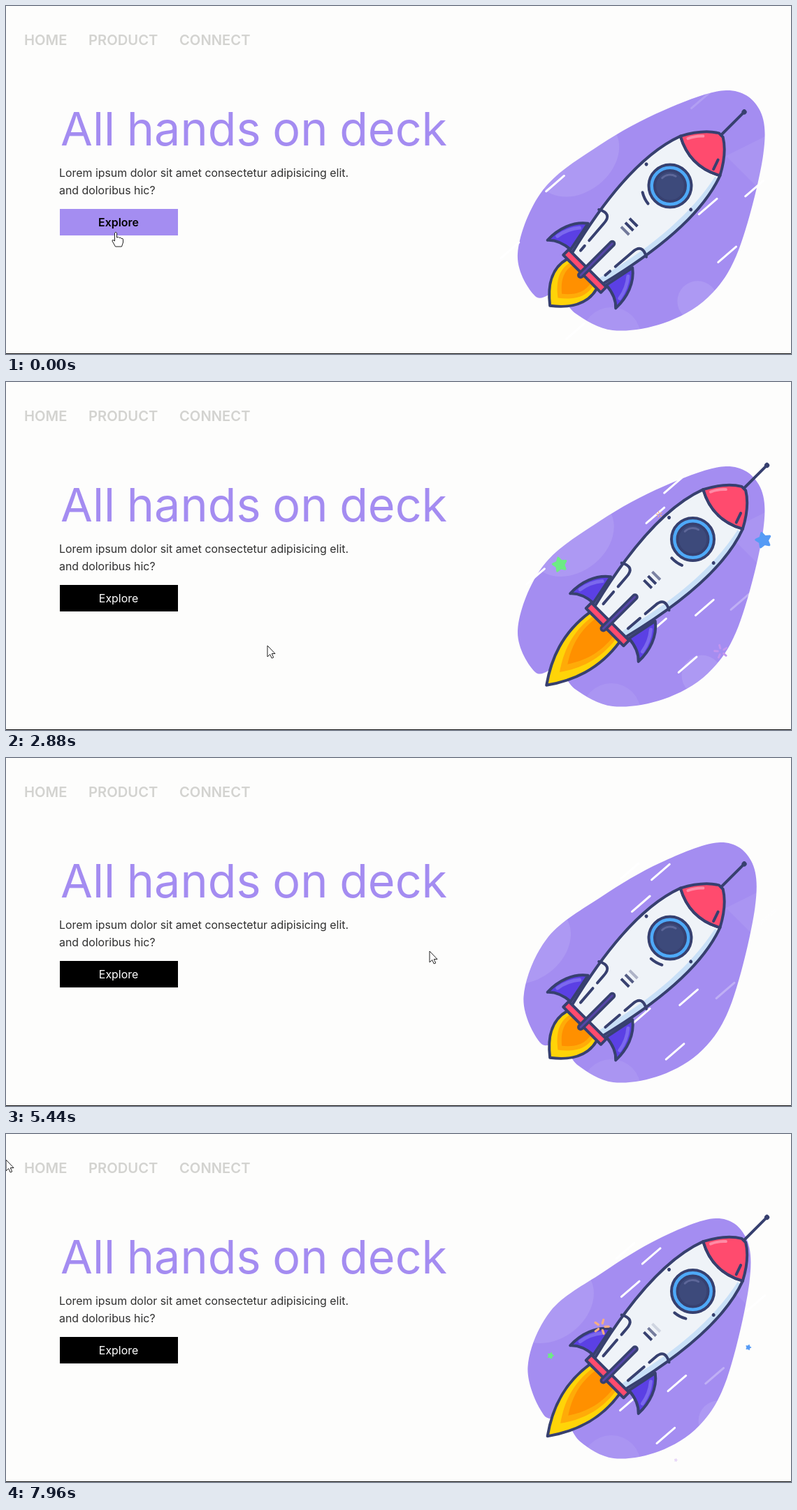
An HTML page that plays this animation: 1123x499 px, repeating every 8 s.

```html
<!DOCTYPE html>
<html lang="en">
<head>
<meta charset="utf-8">
<title>All hands on deck</title>
<style>
  html, body { margin: 0; width: 100%; height: 100%; overflow: hidden; background: #fdfdfc; }
  svg { display: block; width: 1123px; height: 499px; font-family: Inter, Lato, sans-serif; }
  .nav { font-size: 20.2px; font-weight: 600; fill: #d3d3d0; }
  .body { font-size: 15.9px; fill: #303030; }
  .line { fill: none; stroke: #37406f; stroke-width: 4; stroke-linecap: round; stroke-linejoin: round; }
  .edge { stroke: #37406f; stroke-width: 4; stroke-linejoin: round; }
</style>
</head>
<body>
<svg viewBox="0 0 1123 499">
  <defs>
    <clipPath id="inBlob"><path id="clip"/></clipPath>
    <path id="hull" d="M-40-61C-61-5-54 75-31 168H31C54 75 61-5 40-61Q0-39-40-61Z"/>
    <clipPath id="inHull"><use href="#hull"/></clipPath>
    <g id="side">
      <path class="edge" fill="#5b40e4" d="M-45 121C-62 134-70 156-69 179C-60 169-48 166-36 165Z"/>
      <path d="M-49 134Q-60 147-63 165" fill="none" stroke="#7b68ee" stroke-width="5" stroke-linecap="round"/>
    </g>
    <path id="panel" class="line" stroke-dasharray="60 10" d="M-48 96Q-30 86-29 105L-25 156"/>
  </defs>

  <text class="nav" x="26" y="56">HOME</text>
  <text class="nav" x="118" y="56">PRODUCT</text>
  <text class="nav" x="248" y="56">CONNECT</text>
  <text x="78" y="200" font-size="66.500" word-spacing="-2" fill="#a48cf1">All hands on deck</text>
  <text class="body" x="76" y="245">Lorem ipsum dolor sit amet consectetur adipisicing elit.</text>
  <text class="body" x="76" y="270">and doloribus hic?</text>
  <rect id="button" x="77" y="291" width="169" height="38"/>
  <text id="label" class="body" x="161" y="316" text-anchor="middle">Explore</text>
  <rect y="498" width="1123" height="1" fill="#111"/>

  <path id="blob" fill="#a48df1"/>
  <g clip-path="url(#inBlob)" fill="#fff" fill-opacity=".1">
    <ellipse id="glow" rx="66" ry="50"/>
    <circle id="spot" r="29"/>
    <circle cx="866" cy="474" r="42" fill-opacity=".07"/>
    <path d="M1030 215L1100 285V180Z" fill-opacity=".07"/>
  </g>
  <g id="streaks" transform="translate(910 295) rotate(-40.900)" stroke="#fff" stroke-width="3" stroke-linecap="round"></g>

  <g id="rocket">
    <path id="flame" class="edge" fill="#ffd408"/>
    <path id="core" fill="#ffab08"/>
    <path id="heart" fill="#ff9000"/>
    <use href="#side"/>
    <use href="#side" transform="scale(-1 1)"/>
    <use href="#hull" fill="#eff3f8"/>
    <path clip-path="url(#inHull)" fill="#c9e0f7" d="M36-55C50 10 43 85 21 168H80V-55Z"/>
    <use href="#hull" class="edge" fill="none"/>
    <path class="edge" fill="#ff4b6e" d="M-40-61Q-24-91-4-103H4Q24-91 40-61Q0-39-40-61Z"/>
    <path d="M-30-66Q-25-77-17-84" fill="none" stroke="#ff8ba5" stroke-width="4" stroke-linecap="round"/>
    <path class="line" d="M0-104V-149M27-61L22-75"/>
    <circle cy="-150" r="3.600" fill="#37406f"/>
    <circle r="30.500" class="edge" fill="#4ea9f8"/>
    <circle r="22" class="edge" fill="#3d4a7b"/>
    <path d="M-16 0A16 16 0 0 1-4-15.500" fill="none" stroke="#5d6799" stroke-width="3" stroke-linecap="round"/>
    <circle cx="-46" cy="2" r="2.500" fill="#37406f"/>
    <circle cx="45" cy="3" r="2.500" fill="#37406f"/>
    <path id="arc" class="line" d="M39.400-9A40.400 40.400 0 0 1 39.400 9"/>
    <g id="vents"></g>
    <use href="#panel"/>
    <use href="#panel" transform="scale(-1 1)"/>
    <rect class="edge" x="-38" y="167" width="76" height="11" fill="#ff4b6e"/>
    <path class="line" style="stroke-width:10" d="M0 117V181"/>
    <path class="line" style="stroke:#5546a8;stroke-width:3" d="M0 117V181"/>
  </g>
  <g id="stars"></g>

  <g stroke="#222" stroke-width="1" stroke-linejoin="round" fill="#fff">
    <path id="arrow" d="M0 0V16L3.700 12.500L6.200 18L8.700 17L6.300 11.500H11Z"/>
    <path id="hand" d="M-1.500 1.500Q0-1 1.500 1.500V8Q4 6 5 8.500Q7 7 8 9.500Q10.500 8.500 10.500 11V15L8.500 21H-.500L-5 13Q-5 10-1.500 13Z"/>
    <path id="beam" fill="none" d="M-3-7Q0-7 0-5Q0-7 3-7M0-5V5M-3 7Q0 7 0 5Q0 7 3 7"/>
  </g>
</svg>
<script>
const LOOP = 8000;
const STREAM = 2410;        // streaks and vents
const FLIGHT = 2 * STREAM;  // rocket and stars
const WOBBLE = 1460;        // blob and its highlights

const $ = id => document.getElementById(id);
const set = (el, attrs) => { for (const k in attrs) el.setAttribute(k, attrs[k]); };
const add = (parent, tag, attrs) => {
  const el = document.createElementNS('http://www.w3.org/2000/svg', tag);
  set(el, attrs);
  return parent.appendChild(el);
};
const mod = (a, n) => (a % n + n) % n;
const clamp = v => Math.max(0, Math.min(1, v));
const wave = (t, period, peak = 0) => Math.cos(2 * Math.PI * (t - peak) / period);
const ease = u => (1 - Math.cos(Math.PI * clamp(u))) / 2;
const mix = (a, b, u) => a + (b - a) * u;

function smoothLoop(p) {
  const n = p.length, at = i => p[mod(i, n)];
  let d = `M${p[0]}`;
  for (let i = 0; i < n; i++) {
    const [a, b, c, e] = [at(i - 1), at(i), at(i + 1), at(i + 2)];
    d += `C${b.map((v, k) => v + (c[k] - a[k]) / 6)} ${c.map((v, k) => v - (e[k] - b[k]) / 6)} ${c}`;
  }
  return d + 'Z';
}

const outline = [[1030,121],[1077,147],[1083,215],[1048,350],[1004,418],[940,455],[868,465],
  [815,441],[790,411],[757,416],[732,355],[768,264],[850,199],[940,150]];

// The blob narrows about its middle while its left lobe rises.
function drawBlob(t) {
  const squeeze = (1 - wave(t, WOBBLE)) / 2;
  const d = smoothLoop(outline.map(([x, y]) =>
    [x + (880 - x) * .1 * squeeze, y - Math.max(0, 800 - x) * .32 * squeeze]));
  set($('blob'), { d });
  set($('clip'), { d });
  const drift = wave(t, WOBBLE, 240);
  set($('glow'), { transform: `translate(${792 + 48 * drift} ${235 - 35 * drift}) rotate(-38)` });
  set($('spot'), { transform: `translate(${1010 - 40 * drift} ${415 + 16 * drift})` });
}

// Each lane: distance from the centre line, time of passing the middle, opacity.
const lanes = [[-112,1340,1],[-82,1180,1],[-66,830,1],[56,290,1],[67,1420,1],[80,630,1],[126,220,1],[107,880,.3],[27,2330,.3]]
  .map(([offset, middle, alpha]) => ({
    offset, middle, alpha,
    speed: .205 - .126 * ((offset - 22) / 134) ** 4,
    el: add($('streaks'), 'path', { d: 'M0 0H34' })
  }));

function drawStreaks(t) {
  const lead = .35 * STREAM;
  for (const { offset, middle, alpha, speed, el } of lanes) {
    const age = mod(t - middle + lead, STREAM);
    set(el, { transform: `translate(${speed * (lead - age)} ${offset})`, opacity: alpha * clamp(age / 90) });
  }
}

const vents = [0, 1, 2].map(i =>
  add($('vents'), 'path', { d: `M-8 ${91 - 8.5 * i}H8`, class: 'line', style: 'stroke-linecap:butt' }));

function flameShape(w, tip) {
  const h = tip - 178, y1 = 178 + h * .42, y2 = 178 + h * .74, v = w * 1.25, n = w * .72;
  return `M${-w} 178C${-v} ${y1} ${-n} ${y2} 0 ${tip}C${n} ${y2} ${v} ${y1} ${w} 178Z`;
}

const thrust = t => ease((t - 1560) / 1080) - ease((t - 3140) / 1360);

function drawRocket(t) {
  const phase = t % FLIGHT;
  const lift = 32.5 * thrust(phase), push = 53 * thrust(phase + 170);
  set($('rocket'), { transform: `translate(${950 + lift} ${258 - lift}) rotate(45)` });
  set($('flame'), { d: flameShape(30, 243 + push) });
  set($('core'), { d: flameShape(23, 227 + push * .8) });
  set($('heart'), { d: flameShape(18, 219 + push * .65) });
  set($('arc'), { transform: `rotate(${97 + 25 * wave(t, STREAM, 2000)})` });
  set($('panel'), { 'stroke-dashoffset': 70 * t / STREAM });
  vents.forEach((el, i) => set(el, { opacity: clamp(.5 + .7 * wave(t, STREAM, 500 - 280 * i)) }));
}

const polar = (r, turn) => `${r * Math.sin(2 * Math.PI * turn)} ${-r * Math.cos(2 * Math.PI * turn)}`;
const starPath = 'M' + Array.from({ length: 10 }, (_, i) => polar(i % 2 ? .48 : .9, i / 10)).join('L') + 'Z';
const burstPath = Array.from({ length: 5 }, (_, i) => `M${polar(.45, i / 5)}L${polar(.9, i / 5)}`).join('');

// Each star swings along a curve: start, bend, end.
const stars = [
  { color: '#6deb84', d: starPath, from: 1850, to: 3300, curve: [[990,100],[770,180],[778,355]] },
  { color: '#559bf5', d: starPath, from: 2100, to: 3250, curve: [[1088,108],[1118,130],[1050,345]] },
  { color: '#c195ef', d: burstPath, from: 2000, to: 3200, curve: [[1064,215],[1130,277],[940,488]] },
  { color: '#f7ae82', d: burstPath, from: 2750, to: 4000, curve: [[985,140],[730,387],[743,449]] }
].map(({ color, d, ...path }) => ({ ...path, el: add($('stars'), 'path', {
  d, fill: color, stroke: color, 'stroke-width': .28, 'stroke-linejoin': 'round', 'stroke-linecap': 'round' }) }));

function drawStars(t) {
  const phase = t % FLIGHT;
  for (const { from, to, curve: [a, b, c], el } of stars) {
    const u = clamp((phase - from) / (to - from));
    const [x, y] = a.map((v, k) => mix(mix(v, b[k], u), mix(b[k], c[k], u), u));
    set(el, { transform: `translate(${x} ${y}) rotate(${phase * .12}) scale(${14 * Math.sin(Math.PI * u)})` });
  }
}

// The pointer rests at each stop between two times, and glides to the next.
const stops = [[0,700,157,324],[1500,3400,374,378],[3800,4300,182,297],[4950,5440,606,277],
  [6000,6820,157,320],[7000,7000,128,172],[7900,LOOP,0,37]];
const hovers = [[-400, 800], [3650, 4360], [5960, 6890]];
const FADE = 400;

function pointerAt(t) {
  const i = stops.findLastIndex(s => s[0] <= t), a = stops[i], b = stops[i + 1] || a;
  const u = t > a[1] ? ease((t - a[1]) / (b[0] - a[1])) : 0;
  return [mix(a[2], b[2], u), mix(a[3], b[3], u)];
}

function drawPage(t) {
  const h = Math.max(...hovers.map(([on, off]) => clamp((t - on) / FADE) * clamp(1 - (t - off) / FADE)));
  const grey = 200 * (1 - h) + (h ? 0 : 55);
  set($('button'), { fill: `rgb(${164 * h},${141 * h},${241 * h})` });
  set($('label'), { style: `fill:rgb(${grey},${grey},${grey});font-weight:${h > .5 ? 600 : 400}` });
  const [x, y] = pointerAt(t);
  const over = (l, top, r, b) => x >= l && x <= r && y >= top && y <= b;
  const kind = over(77, 291, 246, 329) ? 'hand'
    : over(77, 145, 635, 210) || over(77, 228, 490, 275) ? 'beam' : 'arrow';
  for (const id of ['arrow', 'hand', 'beam'])
    set($(id), { transform: `translate(${x} ${y})`, display: id === kind ? 'inline' : 'none' });
}

function frame(now) {
  const t = now % LOOP;
  for (const draw of [drawBlob, drawStreaks, drawRocket, drawStars, drawPage]) draw(t);
  requestAnimationFrame(frame);
}
requestAnimationFrame(frame);
</script>
</body>
</html>
```
